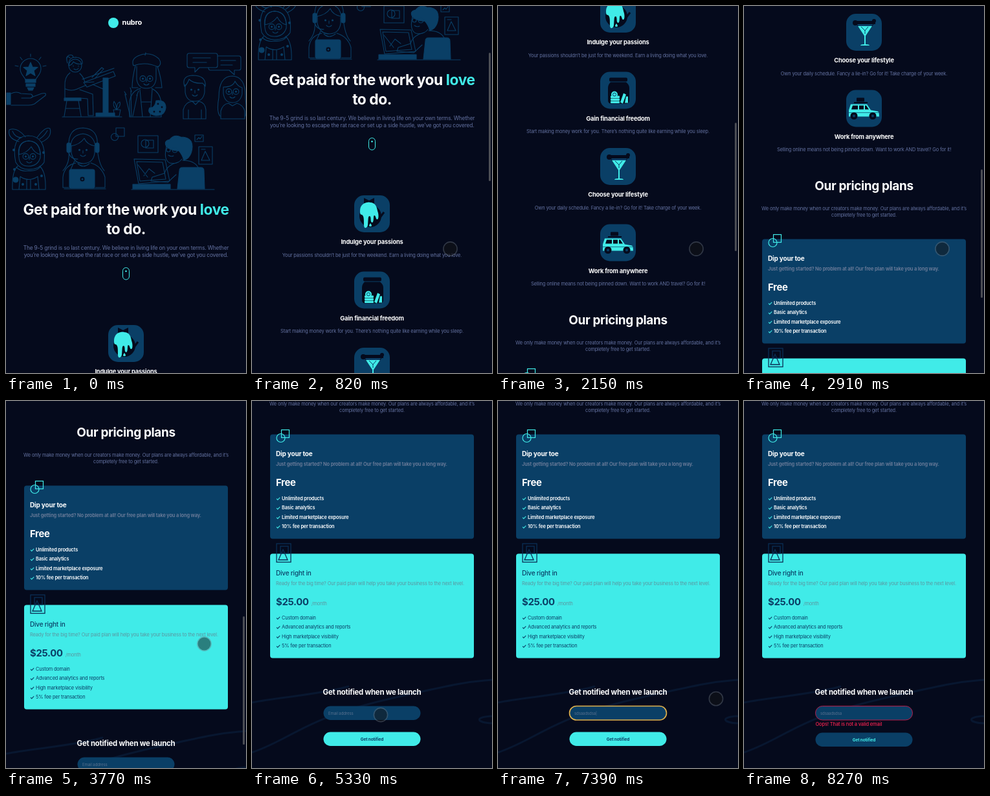
Animation, 371 px wide and 566 px high, one loop 9.07 s. Source, as an HTML page:

```html
<!DOCTYPE html>
<html lang="en">
<head>
<meta charset="utf-8">
<title>Landing page</title>
<style>
html, body { margin: 0; width: 100%; height: 100%; overflow: hidden; background: #050a1c; }
svg { display: block; width: 100vw; height: 100vh; }
text { font-family: Inter, "Open Sans", sans-serif; letter-spacing: -.02em; white-space: pre; }
.art { fill: none; stroke: #0a3f66; stroke-width: 1.1; stroke-linecap: round; stroke-linejoin: round; }
.art .s { fill: #0a3f66; }
.art .b { fill: #050a1c; }
</style>
</head>
<body>
<svg viewBox="0 0 371 566" id="stage"></svg>
<script>
const BG = '#050a1c', BLUE = '#0a3f66', CYAN = '#40ebe8', GREY = '#6371a0';
const LOOP = 9070, TYPED = 'sdsaadsdsa';

const text = (x, y, size, str, fill = '#fff', weight = 400, extra = '') =>
  `<text x="${x}" y="${y + size * .36}" font-size="${size}" fill="${fill}" font-weight="${weight}" ${extra}>${str}</text>`;
const mid = (y, size, str, fill, weight, extra = '') =>
  text(185.5, y, size, str, fill, weight, 'text-anchor="middle" ' + extra);
const rect = (x, y, w, h, r = 0, attrs = '') =>
  `<rect x="${x}" y="${y}" width="${w}" height="${h}" rx="${r}" ${attrs}/>`;
const circle = (x, y, r, attrs = '') => `<circle cx="${x}" cy="${y}" r="${r}" ${attrs}/>`;
const path = (d, attrs = '') => `<path d="${d}" ${attrs}/>`;
const S = 'class="s"', B = 'class="b"';

// Face with eyes, nose and smile, optionally with glasses
const face = (x, y, glasses) =>
  [-1, 1].map(k => circle(x + 5.5 * k, y, 1, S) + (glasses ? circle(x + 5.5 * k, y, 4.4) : '')).join('') +
  path(`M${x} ${y + 1}v4M${x - 4} ${y + 8}q4 4 8 0`);

const art = `<g class="art">` +
  // Bulb above a hand
  path('M31 117c0-7-9-10-9-20a16 16 0 0 1 32 0c0 10-9 13-9 20z') +
  path('M30 113h16v5h-16zM31 120h14v4h-14zM33 126h10l-2 4h-6z', S) +
  path('M38 87l3 7 8 .6-6 5 2 8-7-4.4-7 4.4 2-8-6-5 8-.6z', S) +
  path('M38 74v4M22 79l3 4M54 79l-3 4M14 92l5 1M62 92l-5 1') +
  path('M1 134h6v18h-6z', S) +
  path('M8 135q8-4 15 0l16 1q5 4-1 6h-14M39 141l16-6q8-2 6 3l-17 13q-4 2-9 2h-27') +
  // Woman at a drawing table
  circle(107, 92, 10) + path('M97 92q-1-13 11-13 11 1 10 10-8 2-14-3-2 5-7 6zM99 80q-8-6-4 8-3-9 2-12 6-2 7 3') +
  path('M104 92v1M112 92v1M105 97q4 3 7-1') +
  path('M99 103q-9 6-8 22v17h23l12 1 1 26h8l-1-33-20-7M114 104q6 5 8 14l14-1M92 128q9 4 18 0l14-6') +
  path('M120 118l46-17 3 7-44 17z') + path('M118 113l49-17M133 110l15-15 3 2-13 14') +
  path('M150 111h8v54h-8zM139 165h29v5h-29zM150 128l-16-7', S) +
  path('M90 142h26v4h-26z', S) + path('M94 146l-4 24M112 146l4 24M92 158h22M87 171h92') +
  path('M166 160h11l-2 10h-7zM171 160q-7-6-4-13 4 5 4 13 0-11 5-12 2 6-5 12') +
  // Artist with beret, brushes and palette
  path('M197 92q-4-10 7-15 18-8 32 4 6 8-1 13-19-9-38-2zM215 76l1-4') +
  path('M200 92q-5 20-5 34h9M234 93q6 18 7 33h-10M202 93v20q2 14 15 14t15-14v-19') + face(217, 112, 1) +
  path('M208 127q-14 4-17 20v24h49v-22q-2-16-15-22M207 129l4 42M226 129l-3 42M210 148h14') +
  path('M184 136l8 34M193 131l1 39M203 137l-7 33M183 132l3 5M192 126l2 6M205 131l-3 7') +
  path('M232 146q15-2 15 11-2 13-16 12-14-3-9-12 8 1 10-11z', S) +
  [[235, 151], [241, 156], [238, 163], [229, 163]].map(p => circle(...p, 2, B)).join('') +
  // Couple with speech bubbles
  path('M283 73h41q3 0 3 3v16q0 3-3 3h-25l-7 7v-7h-9q-3 0-3-3v-16q0-3 3-3z') +
  path('M327 77h33q3 0 3 3v16q0 3-3 3h-7v7l-8-7h-29q-3 0-3-4M289 80h27M289 87h21M332 84h23M332 91h18') +
  path('M276 124q-5-16 12-17 22 0 20 17l-4-5q-14 1-21-6-3 8-7 11z') +
  path('M277 121v12q2 14 15 14t15-14v-12M274 174v-14q3-12 14-13l5 5 5-5q10 2 11 13v14zM282 160v14M302 160v14') + face(292, 129) +
  path('M331 170q-6-7-2-29 0-33 21-33 21 1 20 34 2 21 0 28M336 125q15 0 18-9 4 8 11 10v10q-3 13-15 13t-14-14z') +
  face(350, 132, 1) +
  path('M332 174v-12q3-11 12-12l6 4 7-4q10 3 12 12v12z') +
  // Girl in a bunny hood
  path('M20 209q-18-5-15-18 12-5 25 11M48 203q13-18 20-14 4 13-13 21M10 193q4 10 14 10M64 192q-5 9-12 13') +
  path('M15 241q-8-40 19-41 29 0 25 41-7 11-24 11-14 0-20-11z') +
  path('M20 234q-4-25 15-26 20 1 18 26-4 13-18 13t-15-13z') +
  path('M20 229q-1-20 15-21 17 1 18 21-9-2-14-12-7 10-19 12z') + face(36, 232, 1) +
  path('M18 247q-9 8-8 36h51q1-28-9-36M22 263q13 9 27 0l2 20M22 263l-2 20M32 268v14M38 268v14') +
  path('M16 249q8 7 19 5 13 1 18-6') + circle(15, 268, 4, S) +
  [[13, 252], [55, 262], [46, 275], [26, 275], [12, 222], [58, 226]].map(p => circle(...p, 1.4, S)).join('') +
  // Girl with headset and laptop
  path('M97 216q-1-28 22-28 25 1 22 30 2 26 11 36M97 224q2 18-9 30M101 216v11q4 16 19 16 15-1 17-16v-10') +
  path('M100 216q1-17 19-19 17 2 19 19-13-2-17-12-7 10-21 12z') +
  rect(94, 211, 6, 15, 3, S) + rect(138, 211, 6, 15, 3, S) + path('M97 226q3 11 14 10') + face(119, 222) +
  path('M108 242q-18 4-20 22v16h9M131 242q17 5 22 22v16h-15M111 243q8 8 18 0M106 239l-6 13') +
  rect(98, 252, 39, 29, 3, S) + circle(118, 267, 4, B) + circle(118, 267, 1, S) + path('M90 282h64') +
  // Loose shapes and pictures
  circle(168, 202, 5.5) + rect(170, 188, 13, 13) +
  rect(204, 200, 31, 26) + circle(215, 212, 6) + rect(216, 207, 12, 12) +
  rect(292, 199, 13, 10) + path('M295 206l3-3 2 2 3-4') +
  rect(298, 217, 21, 27) + path('M308 224l-6 14h13zM302 221h6') +
  // Man at a drawing tablet
  path('M248 217q-5-9 5-11 7-9 17-4 18 0 18 15-1 17-13 21-3-10-8-15-9 1-19-6z', S) +
  path('M248 217q-5 20 5 25 12 3 19-6M251 230q4 3 8 1') + circle(261, 222, 4) + circle(251, 222, 3) +
  path('M266 241q-17 4-21 17l-19 6-2 6 26 2 13-12M273 238q18 0 24 11') +
  path('M198 236l48 1 7 33-48 4z') + path('M202 240l40 1 5 26-40 3z') + path('M196 275h58v7h-58z', S) +
  path('M219 264l-15-19M213 262l8-11 9 7') +
  path('M268 254q0-5 5-5h28q5 0 5 5l1 28h-42z', S) + path('M194 283h128') + '</g>';

// Badge pictures, each drawn in a 55 by 57 box
const badges = [
  path('M15 4l8 4 8-4v9l-8-3-8 3z', `fill="${BG}"`) + circle(25, 32, 17, `fill="${BG}"`) +
  path('M34 42L46 26', `stroke="${BG}" stroke-width="3"`) +
  path('M9 24c0-9 7-14 15-13 9 0 11 7 12 13 2 5 2 12 0 13-3 1-2-6-5-6-2 0 0 10-3 11-4 0-1-9-4-10-3 0-2 4-3 14-1 5-6 6-6 0 0-10 0-14-3-16-3 0-3-3-3-6z', `fill="${CYAN}"`) +
  path('M25 43q4 5 0 5t0-5', `fill="${CYAN}"`),
  rect(14, 9, 28, 6, 2, `fill="${BG}"`) + path('M16 16h24q5 4 5 9v19q0 5-5 5h-23q-5 0-5-5v-19q0-5 4-9z', `fill="${BG}"`) +
  [37, 41, 45].map(y => rect(16, y, 14, 3.4, 1, `fill="${CYAN}"`)).join('') +
  circle(22, 35, 5, `fill="${CYAN}"`) + circle(22, 35, 2.5, `fill="none" stroke="${BLUE}"`) +
  path('M31 47l5-14 4 2-5 14zM38 48l2-10h3v10z', `fill="${CYAN}"`),
  path('M14 11h31v5h-31z', `fill="${BG}"`) + circle(14, 14, 4, `fill="${BG}"`) + circle(43, 11, 3, `fill="${BG}"`) +
  path('M16 16l13 18 13-18', `fill="none" stroke="${BG}"`) +
  path('M18 19h22L30 34v13q6 0 6 2h-14q0-2 6-2V34z', `fill="${CYAN}"`) +
  path('M23 20l6 6 5-6M29 25v6', `stroke="${BLUE}" fill="none"`),
  rect(16, 12, 12, 6, 1, `fill="${BG}"`) + path('M12 19.5h21', `stroke="${BG}" stroke-width="2"`) +
  path('M4 41v-10l3-9h25l6 9 11 2q2 1 2 8z', `fill="${CYAN}"`) +
  path('M8 30l2-6h8v6zM20 24h7v6h-7zM29 24h2l4 6h-6z', `fill="${BG}"`) +
  path('M4 35h46', `stroke="${BLUE}" stroke-width=".7"`) +
  [12, 41].map(x => circle(x, 40, 5.5, `fill="${BG}"`) + circle(x, 40, 2, `fill="${BLUE}"`)).join('')
];
const features = [
  ['Indulge your passions', 'Your passions shouldn’t be just for the weekend. Earn a living doing what you love.'],
  ['Gain financial freedom', 'Start making money work for you. There’s nothing quite like earning while you sleep.'],
  ['Choose your lifestyle', 'Own your daily schedule. Fancy a lie-in? Go for it! Take charge of your week.'],
  ['Work from anywhere', 'Selling online means not being pinned down. Want to work AND travel? Go for it!']
].map(([head, note], i) => {
  const y = 492 + 117.5 * i;
  return `<g transform="translate(158 ${y})">${rect(0, 0, 55, 57, 15, `fill="${BLUE}"`)}${badges[i]}</g>` +
    mid(y + 72, 9.3, head, '#fff', 700) + mid(y + 92.3, 7.43, note, GREY);
}).join('');

const card = (y, fill, ink, tick, soft, weight, head, note, price, items) =>
  rect(28, y, 315, 161, 4, `fill="${fill}"`) +
  text(37, y + 29.5, 10, head, ink, weight + 100) + text(37, y + 45.5, 7.45, note, soft, weight) +
  text(37, y + 74.5, 14.8, price, ink, 700) +
  items.map((item, i) => {
    const cy = y + 98.7 + 14.5 * i;
    return path(`M38 ${cy + .5}l1.7 1.7 3.500-3.5`, `fill="none" stroke="${tick}" stroke-width="1.1"`) +
      text(46, cy, 7.4, item, ink, weight);
  }).join('');

const plans =
  mid(992, 19, 'Our pricing plans', '#fff', 700) +
  mid(1027, 7.4, 'We only make money when our creators make money. Our plans are always affordable, and it’s', GREY) +
  mid(1037.5, 7.4, 'completely free to get started.', GREY) +
  card(1074.5, BLUE, '#fff', CYAN, '#717f9c', 600, 'Dip your toe',
    'Just getting started? No problem at all! Our free plan will take you a long way.', 'Free',
    ['Unlimited products', 'Basic analytics', 'Limited marketplace exposure', '10% fee per transaction']) +
  card(1258.5, CYAN, BLUE, BLUE, '#5b959f', 400, 'Dive right in',
    'Ready for the big time? Our paid plan will help you take your business to the next level.', '$25.00',
    ['Custom domain', 'Advanced analytics and reports', 'High marketplace visibility', '5% fee per transaction']) +
  text(92, 1335.5, 7.4, '/month', '#5b959f') +
  `<g fill="none" stroke="${CYAN}" stroke-width="1.2">${circle(44.5, 1080, 6.5)}${rect(45.5, 1067.5, 12, 12)}</g>` +
  `<g fill="none" stroke="#0a2f55" stroke-width="1.3">${rect(38, 1243, 22, 28.5)}${rect(44, 1247, 12, 11)}${path('M48 1252l-7 16h14z')}</g>`;

const swirls = `<g transform="translate(0 1023)" fill="none" stroke="#081730" stroke-width="3">` +
  path('M0 465C40 457 110 452 150 440') + path('M0 542C60 522 80 490 210 460S340 433 371 430') +
  path('M371 486C344 487 346 496 371 497') + '</g>';

const form = swirls +
  mid(1472, 11.4, 'Get notified when we launch', '#fff', 700) +
  rect(110.5, 1493.5, 150, 21.5, 10.75, `id="field" fill="${BLUE}"`) +
  text(118, 1504.5, 6.1, '', '#58718f', 400, 'id="entry"') +
  text(110.5, 1521, 7.5, 'Oops! That is not a valid email', '#f5224f', 500, 'id="error"') +
  `<g id="button">${rect(110.5, 1533.5, 150, 21.5, 10.75)}${mid(1544.5, 6.5, 'Get notified', BLUE, 700)}</g>`;

const hero =
  circle(166, 26, 8, `fill="${CYAN}"`) + text(179.5, 25, 11, 'nubro', '#fff', 700) + art +
  mid(314, 22.8, `Get paid for the work you <tspan fill="${CYAN}">love</tspan>`, '#fff', 700) +
  mid(344, 22.8, 'to do.', '#fff', 700) +
  mid(373, 8.35, 'The 9-5 grind is so last century. We believe in living life on your own terms. Whether', GREY) +
  mid(384, 8.35, 'you’re looking to escape the rat race or set up a side hustle, we’ve got you covered.', GREY) +
  rect(180.5, 403.5, 10, 18.5, 5, `fill="none" stroke="${CYAN}"`) + circle(185.5, 409, 1.3, `fill="${CYAN}"`);

const popup = `<g id="popup">` +
  path('M169 381h62q4 0 4 4v70q0 4-4 4h-38l-8 8-8-8h-8q-4 0-4-4v-70q0-4 4-4z', 'fill="#292a2b" fill-opacity=".7"') +
  text(177, 403, 12.5, 'sdaads', '#a3a9ad') + text(177, 438, 12.5, 'sdaasd', '#a3a9ad') + '</g>';

const $ = id => document.getElementById(id);
$('stage').innerHTML = `<g id="page">${hero}${features}${plans}${form}</g>` +
  rect(366, 0, 3, 198, 1.5, 'id="thumb" fill="#4b4d54"') + popup +
  `<g id="cursor">${circle(0, 0, 10, 'fill="#141414" fill-opacity=".5"')}${circle(0, 0, 10.6, 'fill="none" stroke="#6e7880" stroke-opacity=".42" stroke-width="1.6"')}</g>`;

// Scroll flicks: first step, last step, number of steps, resulting offset
const flicks = [
  [540, 820, 5, 200], [1080, 1290, 4, 400], [1620, 1820, 4, 500],
  [2150, 2360, 4, 700], [2910, 3050, 3, 898], [3700, 3910, 4, 1023]
];
// Cursor way points: time, x, y
const trail = [
  [130, 268, 514], [200, 298, 462], [270, 321, 405], [340, 306.5, 374.5], [4340, 306.5, 374.5],
  [4600, 278, 410], [4860, 229, 472], [5160, 229, 472], [5330, 199, 484], [5560, 199, 484],
  [5660, 191, 481], [5900, 191, 481], [5930, 190, 480], [6070, 190, 480], [6400, 191, 496], [6900, 198, 520],
  [7030, 210, 515], [7240, 320, 475], [7380, 340, 457], [7600, 280, 500], [7860, 232, 521],
  [7960, 232, 521], [8130, 285, 540], [8260, 305, 565]
];

const clamp = x => Math.min(1, Math.max(0, x));
const show = (id, on) => $(id).setAttribute('visibility', on ? 'visible' : 'hidden');

function scrollAt(t) {
  let y = 0, age = Infinity;
  for (const [from, to, n, target] of flicks) {
    if (t < from) break;
    const k = Math.min(n - 1, Math.floor((t - from + 2) * (n - 1) / (to - from)));
    const p = (k + .4) / (n - .6);
    y += (target - y) * p * p * (3 - 2 * p);
    age = t - to;
  }
  return { y: Math.round(y), age };
}

function cursorAt(t) {
  const i = trail.findIndex(p => p[0] > t);
  if (i < 1) return null;
  const [t0, x0, y0] = trail[i - 1], [t1, x1, y1] = trail[i];
  const p = (t - t0) / (t1 - t0);
  return [x0 + (x1 - x0) * p, y0 + (y1 - y0) * p];
}

function draw(t) {
  const { y, age } = scrollAt(t);
  $('page').setAttribute('transform', `translate(0 ${-y})`);
  $('thumb').setAttribute('y', Math.round(2 + y * .35));
  $('thumb').setAttribute('opacity', age < 330 ? 1 : age < 470 ? .6 : 0);

  const pos = cursorAt(t);
  show('cursor', pos);
  if (pos) $('cursor').setAttribute('transform', `translate(${pos})`);

  const focus = t >= 6070 && t < 7860, failed = t >= 7930;
  const count = t < 6070 ? 0 : Math.floor((t - 6060) / 65) + 1;
  $('entry').textContent = count ? TYPED.slice(0, count) + (focus ? '|' : '') : 'Email address';
  $('field').setAttribute('stroke', focus ? '#dfb04c' : failed ? '#b51d4b' : 'none');
  $('field').setAttribute('stroke-width', focus ? 1.6 : 1);
  show('popup', t >= 6270 && t < 6600);
  show('error', failed);

  const [pill, label] = $('button').children, hover = clamp((t - 7930) / 250);
  const blend = (a, b) => `color-mix(in srgb, ${b} ${hover * 100}%, ${a})`;
  pill.style.fill = blend(CYAN, BLUE);
  label.style.fill = blend(BLUE, CYAN);
  $('button').setAttribute('transform', `translate(0 ${failed ? 1 : 0})`);
}

function tick() {
  draw(performance.now() % LOOP);
  requestAnimationFrame(tick);
}
tick();
</script>
</body>
</html>
```
